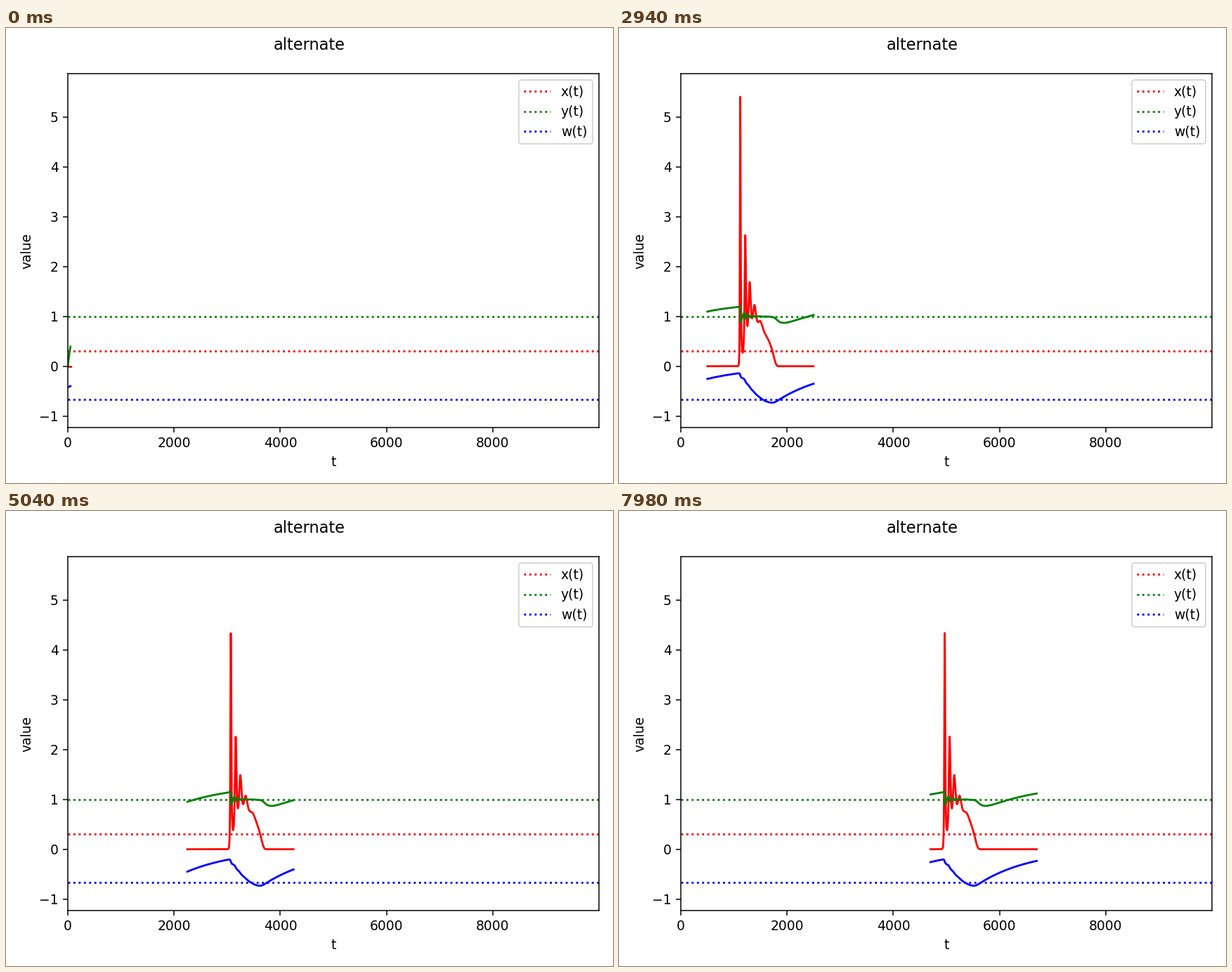
Write a matplotlib script that moves like this. It is 864 px wide and 648 px high and loops after 8000 ms.

```python
import numpy as np
import matplotlib.pyplot as plt
from matplotlib.animation import FuncAnimation

W, H, DPI = 864, 648, 135
LOOP, TICK, HOLD = 8000, 40, 60   # ms
STEP, TRAIL = 50, 2000            # samples per update, visible samples

# Laser with slow logarithmic feedback: intensity x, gain y, feedback w
GAMMA, EPS = 0.01, 0.001
DELTA, K, ALPHA = 1.3, 0.7, 2.0


def slope(s):
    u, y, w = s                   # u = ln x
    x = np.exp(u)
    gain = np.log(1 + ALPHA * x)
    return np.array([
        y - 1,
        GAMMA * (DELTA - y + K * w + gain - x * y),
        -EPS * (w + gain / K),
    ])


def simulate(n, x0=1e-7, y0=0.0, w0=-0.42):
    s = np.array([np.log(x0), y0, w0])
    out = np.empty((n, 3))
    for i in range(n):
        out[i] = s
        a = slope(s)
        b = slope(s + a / 2)
        c = slope(s + b / 2)
        d = slope(s + c)
        s = s + (a + 2 * b + 2 * c + d) / 6
    out[:, 0] = np.exp(out[:, 0])
    return out


updates = -(-LOOP // HOLD)
data = simulate(updates * STEP + 1)
time = np.arange(len(data))

x_fix = DELTA - 1
fixed = (x_fix, 1.0, -np.log(1 + ALPHA * x_fix) / K)
colors = ("red", "green", "blue")

fig = plt.figure(figsize=(W / DPI, H / DPI), dpi=DPI)
fig.suptitle("alternate")
ax = fig.add_axes([88 / W, 1 - 569 / H, 756 / W, 504 / H])
ax.set_xlim(0, 9999)
ax.set_ylim(-1.23, 5.87)
ax.set_xlabel("t")
ax.set_ylabel("value")

for name, level, color in zip("xyw", fixed, colors):
    ax.axhline(level, color=color, ls=":", label=f"{name}(t)")
lines = [ax.plot([], [], color=color)[0] for color in colors]
ax.legend(loc="upper right")


def update(i):
    k = min((i * TICK + TICK // 2) // HOLD, updates - 1)
    end = STEP * (k + 1)
    part = slice(max(0, end - TRAIL), end)
    for line, values in zip(lines, data.T):
        line.set_data(time[part], values[part])
    return lines


ani = FuncAnimation(fig, update, frames=LOOP // TICK, interval=TICK,
                    repeat=True, repeat_delay=0, blit=False)
plt.show()
```
